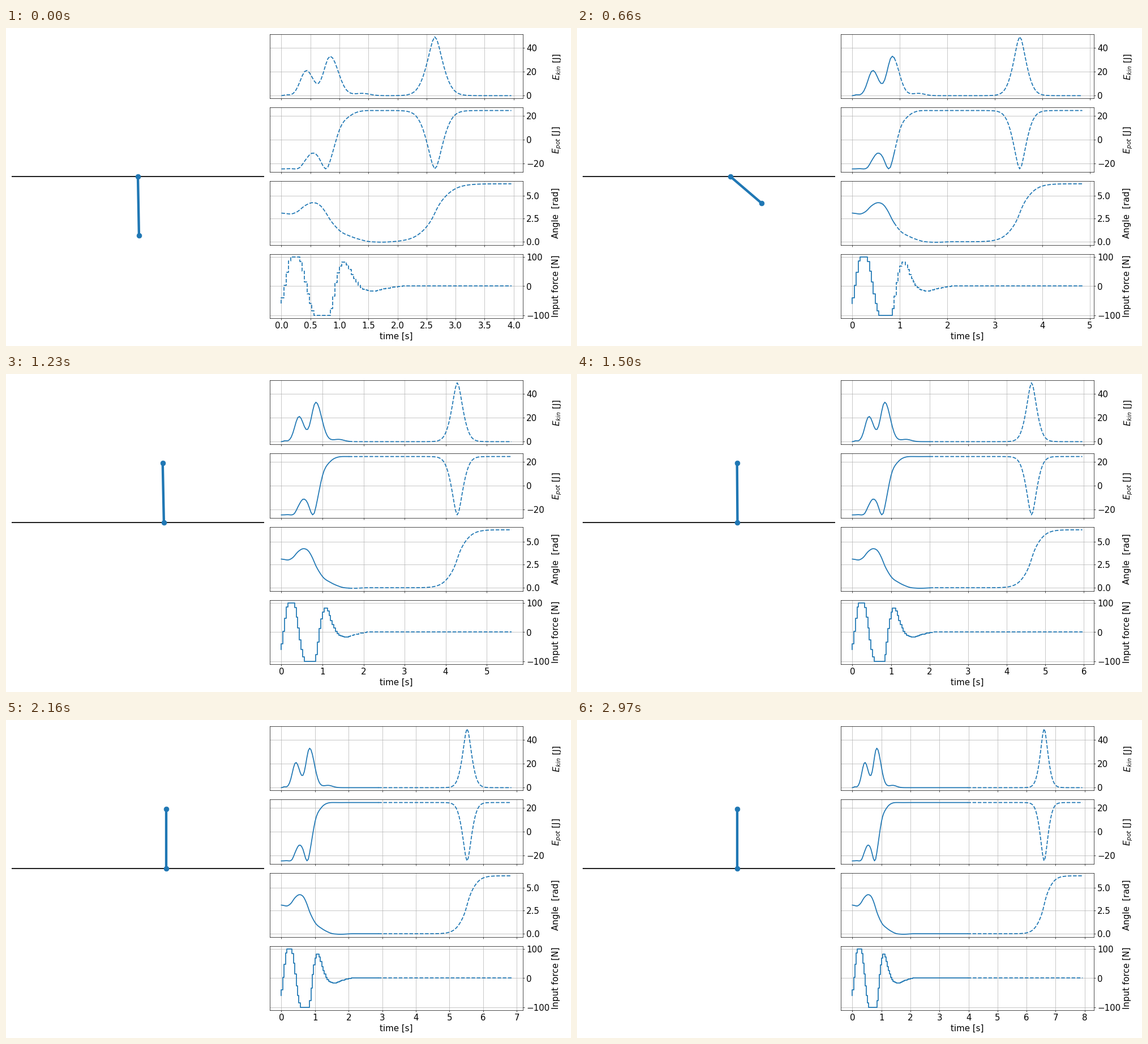
A matplotlib script for the animation above (3000 ms loop, 998 by 561 pixels).

```python
import numpy as np
import matplotlib.pyplot as plt
from matplotlib.animation import FuncAnimation

W, H, DPI = 998, 561, 62.375
N = 100              # frames, and samples in the prediction horizon
DT = 0.04            # simulated seconds per frame
LENGTH = 0.5         # pendulum length [m]
G = 9.81
EPOT = 24.525        # m * g * l [J]
FLIP_TIME = 2.645    # the horizon always ends with one full turn
BLUE = "#1f77b4"

plt.rcParams.update({
    "axes.labelsize": "xx-large",
    "xtick.labelsize": "xx-large",
    "ytick.labelsize": "xx-large",
    "axes.grid": True,
    "lines.linewidth": 2,
})


def curve(t, *points):
    """Smooth cubic Hermite curve through the points, flat after the last."""
    x, y = np.array(points, float).T
    m = np.gradient(y, x)
    i = np.clip(np.searchsorted(x, t) - 1, 0, len(x) - 2)
    h = x[i + 1] - x[i]
    s = np.clip((t - x[i]) / h, 0, 1)
    return ((1 + 2 * s) * (1 - s) ** 2 * y[i] + s * (1 - s) ** 2 * h * m[i]
            + s ** 2 * (3 - 2 * s) * y[i + 1] + s ** 2 * (s - 1) * h * m[i + 1])


def pulse(t, height, center, rise, fall):
    """Bell curve with its own width on each side."""
    width = np.where(t < center, rise, fall)
    return height * np.exp(-((t - center) / width) ** 2 / 2)


def full_turn(s):
    """Free fall from upright through the bottom and back up (0 to 2 pi)."""
    th = np.geomspace(np.pi, 1e-4, 1500)
    c = np.cos(th)
    speed = np.sqrt(2 * G / LENGTH * (1 - c) / (1 - 0.4 * c ** 2)) / 0.85
    step = -np.diff(th) * (1 / speed[1:] + 1 / speed[:-1]) / 2
    tau = np.concatenate([[0], np.cumsum(step)])
    fall = np.interp(np.abs(s - FLIP_TIME), tau, th)
    return np.where(s < FLIP_TIME, fall, 2 * np.pi - fall)


time = np.arange(2 * N) * DT
horizon = time[:N]

# Swing-up: push back and forth, then settle upright.
angle = curve(time, (0, 3.11), (0.08, 3.06), (0.16, 3.01), (0.28, 3.28),
              (0.4, 3.89), (0.55, 4.24), (0.66, 3.98), (0.76, 3.21),
              (0.84, 2.38), (0.92, 1.74), (1, 1.22), (1.2, 0.57),
              (1.35, 0.25), (1.5, 0.03), (1.66, -0.04), (2.1, 0), (2.4, 0))

cart = curve(time, (0, 0), (0.08, -0.018), (0.18, -0.048), (0.28, 0.026),
             (0.4, 0.237), (0.56, 0.51), (0.67, 0.59), (0.76, 0.515),
             (0.88, 0.303), (1, 0.18), (1.12, 0.141), (1.36, 0.213),
             (1.64, 0.37), (1.9, 0.404), (2.2, 0.404))

force = np.clip(curve(
    time, (0, -60), (0.04, -39), (0.08, 2), (0.16, 87), (0.2, 108),
    (0.32, 110), (0.4, 52), (0.52, -60), (0.6, -102), (0.84, -104),
    (0.88, -77), (0.96, 12), (1.08, 83), (1.16, 72), (1.24, 40), (1.38, -1),
    (1.58, -16), (1.8, -9), (2.1, 0), (2.5, 0)), -100, 100)

e_kin = (pulse(time, 0.75, 0.09, 0.035, 0.035)
         + pulse(time, 21, 0.43, 0.103, 0.118)
         + pulse(time, 32.8, 0.84, 0.108, 0.14)
         + pulse(time, 1.9, 1.39, 0.14, 0.13))

turn = full_turn(horizon)
nudge = np.where((horizon > 2.7) & (horizon < 2.9), 1.3, 0)


def history(i):
    past = slice(0, i + 1)
    return e_kin[past], EPOT * np.cos(angle[past]), angle[past], force[past]


def prediction(i):
    ahead = slice(i, i + N)
    theta = angle[ahead] + turn
    return (e_kin[ahead] + EPOT * (1 - np.cos(turn)), EPOT * np.cos(theta),
            theta, force[ahead] + nudge)


fig = plt.figure(figsize=(W / DPI, (H + 0.01) / DPI), dpi=DPI)
grid = fig.add_gridspec(4, 2, left=9.6 / W, right=912.9 / W, top=1 - 11.3 / H,
                        bottom=1 - 512.1 / H, wspace=0.022, hspace=0.1413)

stage = fig.add_subplot(grid[:, 0])
stage.axis("off")
stage.set(xlim=(-1.8, 1.8), ylim=(-1.2, 1.2))
stage.axhline(0, color="black")
rod, = stage.plot([], [], "-o", color=BLUE, lw=5, ms=10)

panels = [
    (r"$E_{kin}$ [J]", -2.43, 51.0),
    (r"$E_{pot}$ [J]", -26.95, 26.95),
    ("Angle  [rad]", -0.355, 6.6),
    ("Input force [N]", -110, 110),
]
axes, solid, dashed = [], [], []
for row, (label, low, high) in enumerate(panels):
    ax = fig.add_subplot(grid[row, 1], sharex=axes[0] if axes else None)
    ax.yaxis.tick_right()
    ax.yaxis.set_label_position("right")
    ax.set_ylabel(label)
    ax.yaxis.set_label_coords(1.1135, 0.5)
    ax.set_ylim(low, high)
    ax.tick_params(labelbottom=row == 3)
    style = "steps-pre" if row == 3 else "default"
    solid += ax.plot([], [], color=BLUE, drawstyle=style)
    dashed += ax.plot([], [], "--", color=BLUE, drawstyle=style)
    axes.append(ax)
axes[-1].set_xlabel("time [s]")


def update(i):
    for line, y in zip(solid, history(i)):
        line.set_data(time[:i + 1], y)
    for line, y in zip(dashed, prediction(i)):
        line.set_data(time[i:i + N], y)
    end = time[i + N - 1]
    axes[0].set_xlim(-0.05 * end, 1.05 * end)
    x, th = cart[i], angle[i]
    rod.set_data([x, x + LENGTH * np.sin(th)], [0, LENGTH * np.cos(th)])
    return [rod, *solid, *dashed]


anim = FuncAnimation(fig, update, frames=N, interval=30, repeat=True,
                     repeat_delay=0, blit=False)
plt.show()
```
